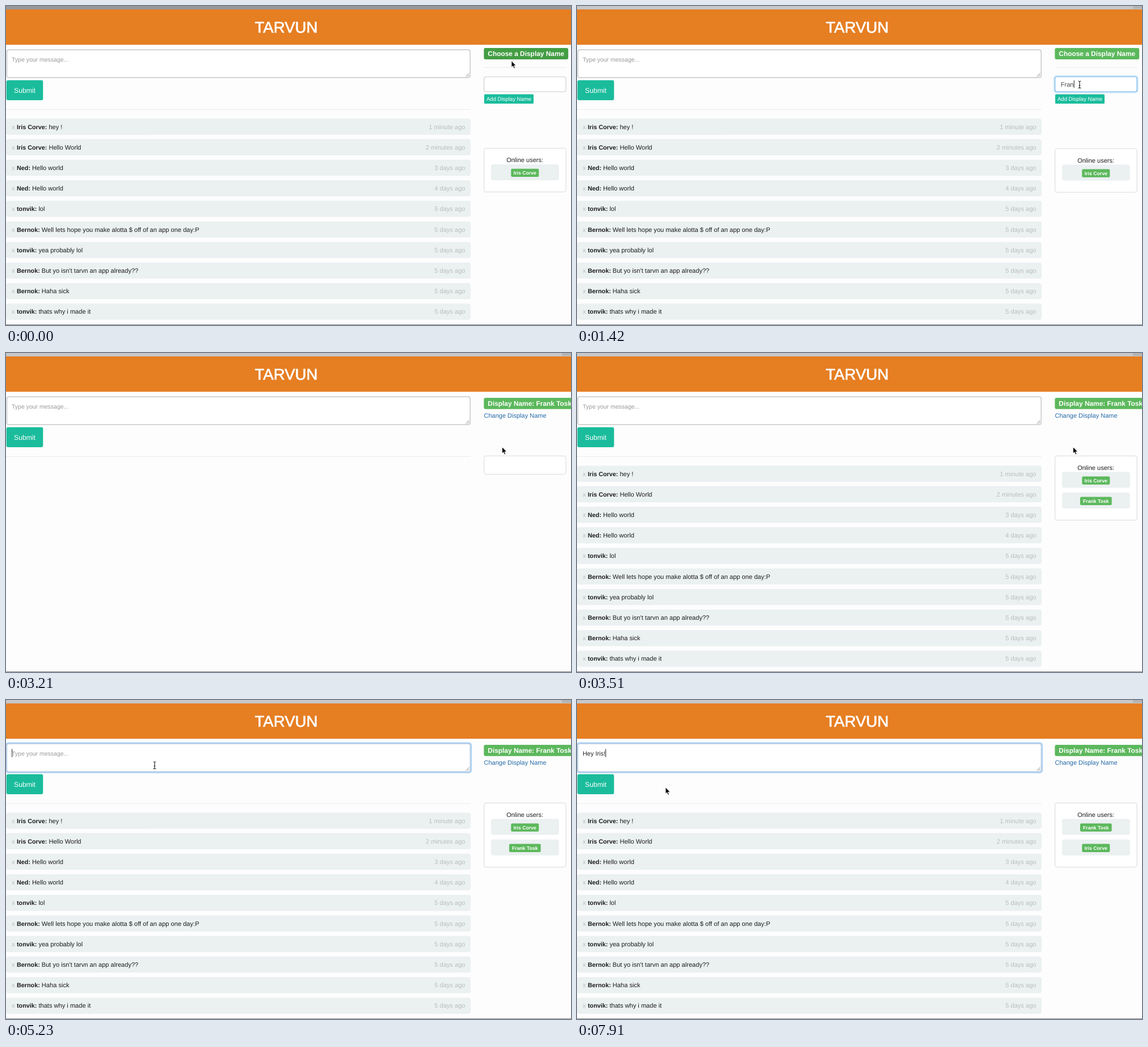
An HTML page for the animation above (8000 ms loop, 996 by 562 pixels).

```html
<!DOCTYPE html>
<html lang="en">
<head>
<meta charset="utf-8">
<title>Chat demo</title>
<style>
  html, body { margin: 0; width: 100%; height: 100%; overflow: hidden; background: #fdfdfd; }
  svg { display: block; width: 996px; height: 562px; }
  text {
    font: 11.1px "Liberation Sans", Arial, sans-serif;
    text-rendering: geometricPrecision;
    white-space: pre;
    fill: #1d1d1d;
  }
  .bold { font-weight: 700; }
  .mid { text-anchor: middle; }
  .end { text-anchor: end; fill: #b9bdbe; }
  .title { font-size: 27.6px; fill: #fff; stroke: #fff; stroke-width: .7px; }
  .submit { font-size: 12.2px; fill: #fff; }
  .add { font-size: 9.55px; fill: #fff; }
  .badge { font: 700 11.9px "Liberation Sans", Arial, sans-serif; fill: #fff; }
  .user { font: 700 8.7px "Liberation Sans", Arial, sans-serif; fill: #fff; }
  .hint { font-size: 10.5px; fill: #999; }
  .typed { font-size: 10.9px; fill: #222; }
  .name { fill: #484848; }
  .link { font-size: 11px; fill: #2469a8; }
  .cross { fill: #b9bdbe; }
  .row { fill: #ebf0f1; }
  .teal { fill: #1abc9c; }
  .green { fill: #5cb85c; }
  .rule { fill: #ebebeb; }
  .box { fill: #fff; stroke: #d9d9d9; }
  .caret { fill: #222; }
</style>
</head>
<body>
<svg viewBox="0 0 996 562">
  <rect width="996" height="562" fill="#fdfdfd"/>
  <rect id="bar" width="996" height="6"/>
  <rect id="tab" x="980" width="16" height="5" fill="#b4b4b4"/>
  <rect y="6" width="996" height="62.3" fill="#e67e22"/>
  <text class="title mid" x="494" y="47.3">TARVUN</text>

  <rect id="areaGlow" x=".3" y="75.8" width="819.6" height="52" rx="4" fill="none" stroke="#aed2f5" stroke-width="2.6"/>
  <rect id="area" x="1.5" y="77.2" width="816.7" height="49" rx="3.5" fill="#fff" stroke="#bcbcbc" stroke-width="1.2"/>
  <path d="M810.8 124.3l5.6-5.6M814 124.3l2.4-2.4" stroke="#777" stroke-width=".9"/>
  <text id="hint" class="hint" x="10" y="97.6">Type your message...</text>
  <text id="message" class="typed" x="10" y="97.6"></text>
  <rect id="messageCaret" class="caret" y="86.3" width="1" height="14.4"/>
  <rect class="teal" x=".7" y="130.7" width="64.6" height="35.4" rx="3"/>
  <text class="submit mid" x="33" y="153">Submit</text>
  <rect class="rule" y="181.8" width="819" height="1"/>
  <g id="list"></g>

  <g id="chooser">
    <rect id="choose" x="842.4" y="74" width="148.8" height="20" rx="3"/>
    <text class="badge" x="849.3" y="88.2">Choose a Display Name</text>
    <rect class="rule" x="842.5" y="107.8" width="145" height="1"/>
    <rect id="inputGlow" x="842" y="124" width="145.6" height="27.6" rx="4" fill="none" stroke="#d3e9fa" stroke-width="4.5"/>
    <rect id="input" x="842.7" y="124.7" width="144.3" height="26.3" rx="3" fill="#fff" stroke-width="1.1"/>
    <text id="name" class="name" x="852.7" y="142"></text>
    <rect id="nameCaret" class="caret" y="131" width="1" height="13.2"/>
    <rect class="teal" x="843" y="155.5" width="87" height="16.4" rx="1.5"/>
    <text class="add mid" x="886.5" y="167.1">Add Display Name</text>
  </g>
  <g id="chosen">
    <rect class="green" x="842.4" y="79" width="170" height="19.7" rx="3"/>
    <text class="badge" x="849.3" y="93.1">Display Name: Frank Tosk</text>
    <text class="link" x="842.5" y="114.2">Change Display Name</text>
  </g>
  <g id="online"></g>

  <rect y="561" width="996" height="1" fill="#858585"/>
  <path id="arrow" d="M0 0V11.6l2.6-2.4 1.9 4.4 2-.8-1.9-4.3H8.2z" stroke="#fff" stroke-width=".9"/>
  <path id="beam" d="M-2.4-6.2q2 0 2.4 1.2q.4-1.2 2.4-1.2M0-5V5M-2.4 6.2q2 0 2.4-1.2q.4 1.2 2.4 1.2M-1.3 1.4h2.6" fill="none" stroke="#222" stroke-width="1.1"/>
</svg>
<script>
const LOOP = 8000;
const $ = id => document.getElementById(id);
const show = (id, on) => { $(id).style.display = on ? '' : 'none'; };

const IRIS = 'Iris Corve', FRANK = 'Frank Tosk';
const MESSAGES = [
  [IRIS, 'hey !', '1 minute'],
  [IRIS, 'Hello World', '2 minutes'],
  ['Ned', 'Hello world', '3 days'],
  ['Ned', 'Hello world', '4 days'],
  ['tonvik', 'lol', '5 days'],
  ['Bernok', 'Well lets hope you make alotta $ off of an app one day:P', '5 days'],
  ['tonvik', 'yea probably lol', '5 days'],
  ['Bernok', "But yo isn't tarvn an app already??", '5 days'],
  ['Bernok', 'Haha sick', '5 days'],
  ['tonvik', 'thats why i made it', '5 days']
];

// Each entry: start time, value(s) held until the next entry
const NAME = [[0, 0], [670, 1], [970, 3], [1420, 4], [1570, 5], [1720, 7], [1870, 8], [2020, 9], [2170, 10]];
const MESSAGE = [[0, 0], [5970, 1], [6270, 3], [6420, 4], [6720, 5], [6870, 6], [7020, 7], [7170, 8], [7470, 9]];
const POINTER = [
  [0, 'arrow', 891, 96.5], [150, 'arrow', 889, 113], [320, 'beam', 886, 138.5],
  [2020, 'beam', 885, 146], [2170, 'arrow', 884, 158], [2320, 'arrow', 881, 169],
  [2470, 'arrow', 878, 168], [2620, 'arrow', 876, 167], [2770, 'arrow', 874.5, 165.5],
  [4020, 'arrow', 896, 180], [4170, 'arrow', 838, 232], [4320, 'arrow', 700, 256],
  [4480, 'arrow', 530, 200], [4630, 'arrow', 370, 108], [4780, 'arrow', 268, 50],
  [4930, 'beam', 262, 115], [7620, 'arrow', 232, 128], [7760, 'arrow', 184, 145], [7910, 'arrow', 156, 153.7]
];
const at = (track, t) => track.filter(k => k[0] <= t).pop();

$('list').innerHTML = MESSAGES.map(([who, text, age], i) => {
  const y = 198.4 + i * 36.22;
  return `<rect class="row" y="${y}" width="819" height="28.3" rx="4"/>
    <text x="10" y="${y + 18.1}" class="cross">x</text>
    <text x="19" y="${y + 18.1}"><tspan class="bold" font-size="10.8" style="font-size:10.8px">${who}: </tspan>${text}</text>
    <text class="end" x="809.5" y="${y + 18.1}">${age} ago</text>`;
}).join('');

function panel(y, users) {
  const height = users.length ? 40.7 + users.length * 36.2 : 32.5;
  const rows = users.map((user, i) => {
    const top = y + 28.3 + i * 36.2, w = user === FRANK ? 55.6 : 49;
    return `<rect class="row" x="855" y="${top}" width="119.7" height="28" rx="4"/>
      <rect class="green" x="${914.8 - w / 2}" y="${top + 7.8}" width="${w}" height="14.3" rx="2"/>
      <text class="user mid" x="914.8" y="${top + 18}">${user}</text>`;
  }).join('');
  const label = users.length ? `<text class="mid" x="914.6" y="${y + 24.3}" style="font-size:11px">Online users:</text>` : '';
  return `<rect class="box" x="842.7" y="${y}" width="144.3" height="${height}" rx="3.5"/>${label}${rows}`;
}

function type(id, text, caretOn) {
  const el = $(id), caret = id + 'Caret';
  if (el.textContent !== text) el.textContent = text;
  $(caret).setAttribute('x', +el.getAttribute('x') + el.getComputedTextLength() + .2);
  show(caret, caretOn);
}

let shown = '';
function render(t) {
  const active = t >= 150, named = t >= 3210;
  $('bar').setAttribute('fill', active ? '#c8c8c8' : '#989898');
  show('tab', active);
  $('choose').setAttribute('fill', active ? '#5cb85c' : '#449d44');
  show('chooser', !named);
  show('chosen', named);
  show('list', t < 3210 || t >= 3510);

  const inputOn = t >= 500;
  show('inputGlow', inputOn);
  $('input').setAttribute('stroke', inputOn ? '#6bb2ea' : '#ccc');
  if (!named) type('name', FRANK.slice(0, at(NAME, t)[1]), inputOn && t < 2470);

  const areaOn = t >= 5230;
  const length = at(MESSAGE, t)[1];
  show('areaGlow', areaOn);
  $('area').setAttribute('stroke', areaOn ? '#b3c8dc' : '#bcbcbc');
  show('hint', !length);
  type('message', 'Hey Iris!'.slice(0, length), areaOn && !(t >= 5520 && t < 5670));

  const users = !named ? [IRIS] : t < 3510 ? [] : t < 7620 ? [IRIS, FRANK] : [FRANK, IRIS];
  const top = named ? 181.3 : active ? 251.3 : 250.7;
  const key = top + users.join();
  if (key !== shown) {
    $('online').innerHTML = panel(top, users);
    shown = key;
  }

  const [, shape, x, y] = at(POINTER, t);
  for (const id of ['arrow', 'beam']) show(id, id === shape);
  $(shape).setAttribute('transform', `translate(${x} ${y})`);
}

const start = performance.now();
function tick() {
  render((performance.now() - start) % LOOP);
  requestAnimationFrame(tick);
}
tick();
</script>
</body>
</html>
```
